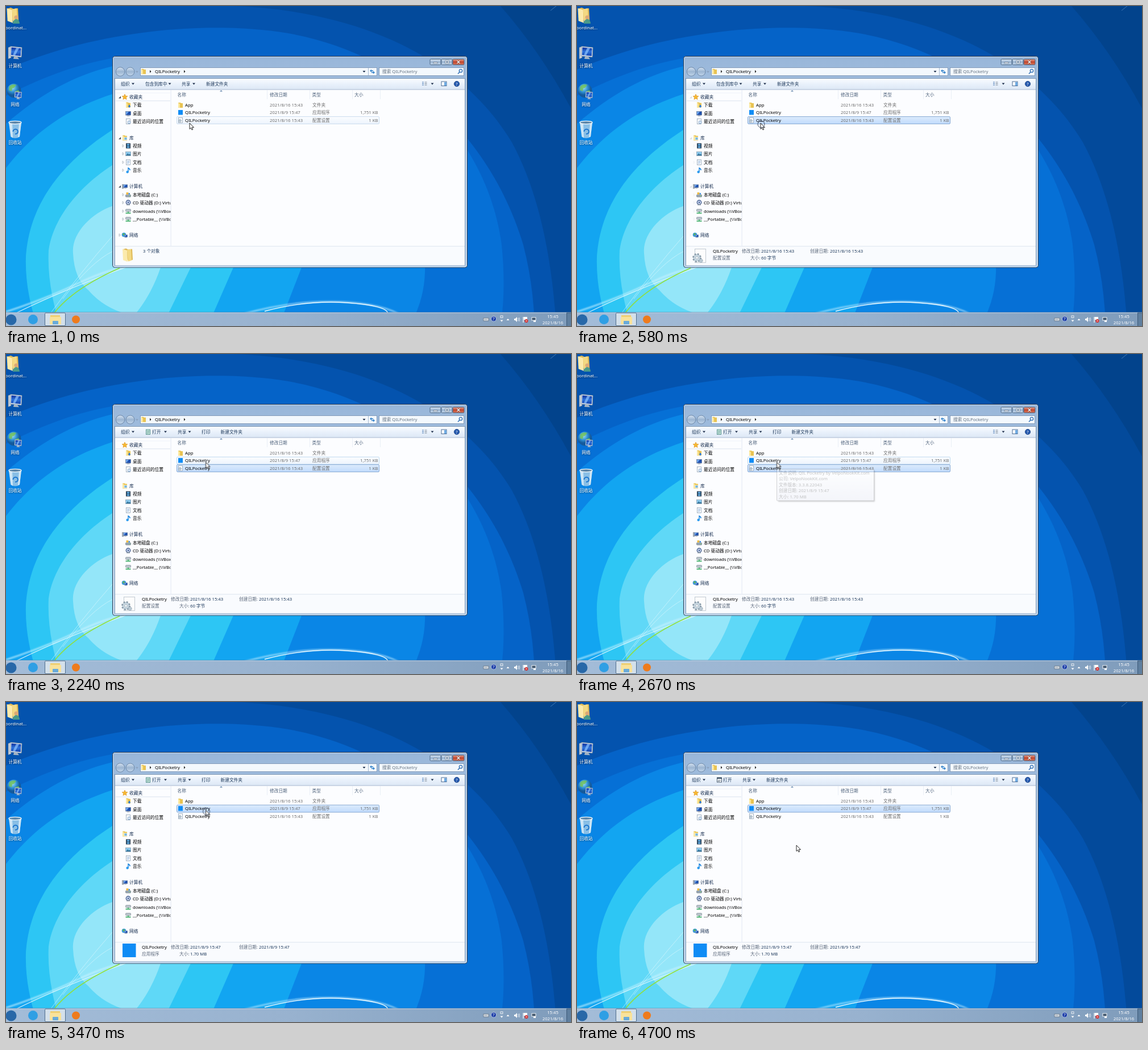
Write an HTML page that moves like this. It is 994 by 563 pixels and loops after 8 s.

```html
<!DOCTYPE html>
<html lang="zh-CN">
<head>
<meta charset="utf-8">
<title>文件夹窗口</title>
<style>
html, body { margin: 0; width: 100%; height: 100%; overflow: hidden; background: #034a9b; }
svg { display: block; width: 994px; height: 563px; }
text { font: 7.7px "Noto Sans", "Noto Sans CJK SC", "Open Sans", sans-serif; white-space: pre; }
.desk { filter: drop-shadow(0 1px 1px #0008); }
</style>
</head>
<body>
<svg id="stage" viewBox="0 0 994 563" xmlns="http://www.w3.org/2000/svg"></svg>
<script>
const LOOP = 8000;
const APP = 'QILPocketry';
const SITE = 'VelpoNookKit.com';

const rect = (x, y, w, h, fill, more = '') =>
  `<rect x="${x}" y="${y}" width="${w}" height="${h}" fill="${fill}" ${more}/>`;
const circle = (x, y, r, fill, more = '') =>
  `<circle cx="${x}" cy="${y}" r="${r}" fill="${fill}" ${more}/>`;
const path = (d, fill, more = '') => `<path d="${d}" fill="${fill}" ${more}/>`;
const line = (d, color, w = 1, more = '') =>
  path(d, 'none', `stroke="${color}" stroke-width="${w}" ${more}`);
// y is the middle of the line of text
const text = (x, y, s, fill = '#000', more = '') =>
  `<text x="${x}" y="${y + 2.8}" fill="${fill}" ${more}>${s}</text>`;
const group = (id, body, more = '') => `<g id="${id}" ${more}>${body}</g>`;
const at = (x, y, body, k = 1) => `<g transform="translate(${x} ${y}) scale(${k})">${body}</g>`;
const ramp = (id, ...colors) =>
  `<linearGradient id="${id}" x2="0" y2="1">${colors.map((c, i) =>
    `<stop offset="${i / (colors.length - 1)}" stop-color="${c}"/>`).join('')}</linearGradient>`;
const down = (x, y, fill = '#1e2f4c') => path(`M${x - 2.5} ${y - 1.5}h5l-2.5 3z`, fill);
const right = (x, y) => path(`M${x - 1} ${y - 2.5}v5l2.5 -2.5z`, '#222');

// icons, drawn around their own middle
const folder = path('M-4-4.5h4l1 1h3v8h-8z', '#e9c352') + path('M-4-4l3 1.5V5l-3-1z', '#fbe79b');
const bigFolder = path('M-9-10l5-1.5 4 2 7-1 1 19-8 2z', '#dfb957') +
  path('M-2-9l7-1.5 1 20-6 2z', '#f3d983') + path('M-10-10.5l8 2.5 1 20-8-3z', '#fbeaac');
const page = rect(-3.5, -4.5, 7, 9, '#fff', 'stroke="#8da0b4" stroke-width=".8"');
const gear = r => circle(0, 0, r, '#b9cbd8', `stroke="#8a9caa" stroke-width="${r * .45}" stroke-dasharray="${r * .42} ${r * .365}"`) +
  circle(0, 0, r * .8, '#c9d8e2') + circle(0, 0, r * .35, '#f5f8fa', 'stroke="#8798a5" stroke-width=".6"');
const config = page + at(-1, .8, gear(2.4));
const screen = rect(-4.5, -3.5, 9, 6.5, '#1d4fae', 'stroke="#7888a0" stroke-width=".8"') +
  path('M-4-3h5l-4 5h-1z', '#6ea6ee') + rect(-2.5, 3.5, 5, 1.2, '#8794a5');
const pc = rect(-4.5, -3, 2.5, 7, '#aeb9c6', 'stroke="#66778b" stroke-width=".6"') + at(1.2, 0, screen, .8);
const globe = circle(-1.5, -.5, 3.8, '#3c9bd8') + path('M-4-2q2-2 4 0l-2 3z', '#62b553') + at(2, 1.8, screen, .6);
const drive = rect(-4.5, 0, 9, 4, '#9aa8b5', 'rx="1" stroke="#64717e" stroke-width=".6"') + rect(1.5, 1.6, 2, 1, '#6de06b');
const share = rect(-4.5, -3.5, 9, 4, '#bcc6cf', 'rx="1" stroke="#6d7983" stroke-width=".6"') +
  path('M-.7.5h1.4v2h3.8v1.7h-9v-1.7h3.8z', '#37aa62');
const icons = {
  star: path('M0-5l1.4 3.3 3.6.3-2.7 2.4.8 3.5L0 2.7l-3.1 1.8.8-3.5L-5-1.4l3.6-.3z', '#f8b92f', 'stroke="#d68a1d" stroke-width=".6"'),
  down: folder + path('M1 0h2v2h1.5L2 5-.5 2H1z', '#2b7de0'),
  desk: screen,
  recent: page + circle(1.5, 1.5, 2.5, '#dceaf8', 'stroke="#5c86b4" stroke-width=".7"'),
  lib: folder + rect(-1, -1, 5, 4.5, '#76b7dd', 'stroke="#fff" stroke-width=".6"'),
  video: rect(-4, -4.5, 8, 9, '#26394d') + rect(-2.4, -3.4, 4.8, 3, '#5ca7dc') + rect(-2.4, .6, 4.8, 3, '#5ca7dc'),
  photo: rect(-4.5, -3.5, 9, 7, '#8fcdf1', 'stroke="#8594a4" stroke-width=".7"') + path('M-4 3l3-4 2 2 2-1 1.5 3z', '#39799f'),
  doc: page + line('M-2-2h4M-2 0h4M-2 2h3', '#5b8fc6', .7),
  music: line('M0 3.5V-4q3 1 3 4', '#1b83dc', 1.5) + circle(-1.4, 3, 2.2, '#2d9cf0'),
  pc, net: globe,
  disk: drive + rect(-3.5, -4, 4, 3.5, '#efb93e') + rect(.5, -3, 2.5, 2.5, '#3f8ee0'),
  cd: circle(0, -.5, 3.8, '#c9d4ec', 'stroke="#3d5789" stroke-width="1.2"') + circle(0, -.5, 1.2, '#32528f') + rect(-3, 2.5, 6, 2, '#8795a5'),
  share
};

const defs = `<defs>
<linearGradient id="bar"><stop stop-color="#a3bcd8"/><stop offset=".5" stop-color="#98b2cf"/><stop offset="1" stop-color="#7f9cbb"/></linearGradient>
${ramp('frame', '#98b6d9', '#b5cee9', '#b9d1ea')}
${ramp('tools', '#fafcff', '#e9f1fb', '#dce7f5')}
${ramp('picked', '#dcebfc', '#c1dbfc')}
${ramp('hover', '#fbfdff', '#edf4fd')}
${ramp('tip', '#ffffff', '#e4e5f0')}
${ramp('knob', '#d6e3f2', '#9db6d2', '#c3d7ec')}
${ramp('red', '#e2a08f', '#c4472e', '#d2755a')}
${ramp('glass', '#0d2f9c', '#2f74dc', '#0f3fae')}
<radialGradient id="earth" cx=".4" cy=".3"><stop stop-color="#9fdcf8"/><stop offset=".6" stop-color="#2d8fd2"/><stop offset="1" stop-color="#145a9c"/></radialGradient>
<clipPath id="side"><rect x="192" y="148" width="97.5" height="274"/></clipPath>
<filter id="soft"><feGaussianBlur stdDeviation="1.2"/></filter></defs>`;

function wallpaper() {
  const bands = [
    ['M0 0H400C620 8 800 90 890 240Q955 360 968 563H0z', '#0453ae'],
    ['M0 112C150 45 330 30 450 42C680 62 850 220 910 420Q928 490 930 563H0z', '#0563c8'],
    ['M0 158C70 122 130 102 187 92H600C740 130 850 260 872 420Q880 500 870 563H0z', '#0670d6'],
    ['M0 207C60 155 120 122 187 106H600C700 260 740 400 737 470Q735 520 710 563H0z', '#0a86e6'],
    ['M0 285C50 220 110 180 187 155H450Q540 330 520 460L480 563H0z', '#12a5f1'],
    ['M35 440C40 370 75 290 187 218H350Q420 360 400 460L355 563H55Q33 500 35 440z', '#2dc6f4'],
    ['M75 430C80 390 110 330 187 280H270Q345 380 325 460L275 563H95Q72 490 75 430z', '#5fd8f7'],
    ['M118 435C115 400 150 365 187 352H250Q290 410 272 460Q255 510 225 545Q175 535 145 500Q120 480 118 435z', '#94e6f9']
  ];
  return rect(0, 0, 994, 563, '#034a9b') + path('M870 0H994V180Q940 80 870 0z', '#02438c') +
    bands.map(([d, c]) => path(d, c)).join('') +
    line('M0 538Q70 515 120 491T205 460', '#c9f3ff', 3, 'opacity=".65" filter="url(#soft)"') +
    line('M18 540Q100 500 210 460', '#effcff', 1.2, 'opacity=".85"') +
    line('M84 541Q118 497 200 461', '#8fe03c', 1.6) +
    line('M78 541Q130 470 187 405M100 515Q150 450 187 432', '#e4faff', .8, 'opacity=".7"') +
    line('M420 541Q500 519 575 520T690 541', '#bdeaff', 3, 'opacity=".6" filter="url(#soft)"') +
    line('M455 537Q530 517 600 522T672 541', '#f1fcff', 1.3) +
    line('M958 8L968 0', '#4c86bd', .8);
}

function desktop() {
  const monitor = path('M-9-11L11-9 10 8-10 6z', '#dce5ee', 'stroke="#7d8b9b" stroke-width=".7"') +
    path('M-7.5-9.2L9.5-7.5 8.7 6-8.3 4.3z', 'url(#glass)') + path('M1-8.3l5 .5L-1 5l-4-.4z', '#8ec5ff', 'opacity=".7"') +
    path('M-3 7l6 .6 3 4-10-.5z', '#aab7c5');
  const tower = path('M-13-9l5-2v20l-5 2z', '#c7d1dc', 'stroke="#6c7b8c" stroke-width=".6"');
  const earth = circle(0, 0, 12.5, 'url(#earth)') +
    path('M-8-8q6-5 12-2l-4 5-3 1-1 5-5-2zM2 1l6-2 2 4-5 6z', '#74c25a', 'opacity=".85"');
  const bin = path('M-11-13H11L8 12Q0 17-8 12z', '#a9cde6', 'opacity=".8"') +
    path('M-11-13l4 25 3 2-1-27zM7-13h4L8 12l-3 1z', '#e6f3fb', 'opacity=".75"') +
    '<ellipse cy="-13" rx="11" ry="2.6" fill="#5d86a8" stroke="#eef7fc" stroke-width="1.4"/>' +
    line('M-3.5 3a4.2 4.2 0 1 1 3.5 4', '#1f78cf', 2);
  return at(13, 16, bigFolder, 1.15) + circle(18, 20, 3.6, '#dba877') + path('M12 31q1-8 6-8t6 8z', '#4a9a8a') +
    at(17, 82, tower + monitor) + at(14, 149, earth) + at(21, 157, monitor, .6) + at(16, 218, bin) +
    text(36, 38, 'Coordinat...', '#fff', 'class="desk" text-anchor="end"') +
    [['计算机', 105], ['网络', 173], ['回收站', 240]].map(([s, y]) => text(16, y, s, '#fff', 'class="desk" text-anchor="middle"')).join('');
}

function taskbar() {
  return rect(0, 539, 994, 24, 'url(#bar)') + rect(0, 538.6, 994, .8, '#5c7c9f') + rect(0, 539.4, 994, .9, '#c3d5e6') +
    circle(9, 552, 9.5, '#2868a8') + circle(47.5, 551.5, 8.5, '#2f9fe4') +
    rect(68.5, 540, 36, 22.5, '#d3e0eb', 'rx="1.5" stroke="#506d8c"') +
    rect(78, 544, 17, 14, '#efcf72') + rect(77, 547, 20, 13, '#f8e29b', 'rx="1"') + rect(82, 554, 10, 6, '#69abda', 'rx="1"') +
    circle(123, 551.5, 7, '#ee7b1d') +
    rect(840, 549, 9, 5, '#d4dbe2', 'stroke="#5e6c7a" stroke-width=".7"') + line('M842 551.5h5', '#5e6c7a', .8, 'stroke-dasharray="1 .7"') +
    circle(858, 550.5, 4.5, '#1d3fa8', 'stroke="#dce6f4" stroke-width=".7"') + text(858, 550.3, '?', '#fff', 'text-anchor="middle" font-weight="700"') +
    rect(870, 545, 4, 3.5, 'none', 'stroke="#fff" stroke-width=".8"') + down(872, 554, '#fff') +
    path('M880.5 553h5l-2.5-3z', '#fff') +
    path('M894 550h2l3-3v9l-3-3h-2z', '#fff') + line('M900.5 549q2 2.5 0 5M902.5 548q2.5 3.5 0 7', '#fff', .8) +
    line('M910 547v10', '#fff', 1.2) + path('M911 547h6v5h-6z', '#fff') +
    circle(915.5, 554, 3, '#d12b2b') + line('M914.3 552.8l2.4 2.4m0-2.4l-2.4 2.4', '#fff', .8) +
    rect(925, 548, 7, 5, '#40566d', 'stroke="#fff" stroke-width=".9"') + rect(928, 553, 4, 3, '#fff') +
    text(962, 546, '15:45', '#fff', 'text-anchor="middle"') + text(962, 557, '2021/8/16', '#fff', 'text-anchor="middle"') +
    rect(986.5, 540, 8, 23.5, '#5f7f9f', 'stroke="#3d5a79"');
}

function chrome() {
  const button = (x, w, fill) => rect(x, 93.5, w, 10, fill, 'rx="1.5" stroke="#46617f" stroke-width=".9"');
  return rect(187.5, 88.5, 624, 371.5, 'url(#frame)', 'rx="4" stroke="#20344d"') +
    rect(188.5, 89.5, 622, 369.5, 'none', 'rx="3" stroke="#dbe9f7" stroke-width=".8"') +
    button(746, 19, 'url(#knob)') + button(766, 19, 'url(#knob)') + button(786, 20, 'url(#red)') +
    rect(752, 99, 7, 2, '#fff', 'stroke="#465b74" stroke-width=".6"') +
    rect(773.5, 96.5, 5, 4, 'none', 'stroke="#465b74" stroke-width="2"') + rect(773.5, 96.5, 5, 4, 'none', 'stroke="#fff"') +
    line('M793.5 96l5 5m0-5l-5 5', '#5b2a25', 2.4) + line('M793.5 96l5 5m0-5l-5 5', '#fff', 1.3) +
    circle(201, 115.5, 7.8, 'url(#knob)', 'stroke="#6d88a8"') + circle(218.5, 115.5, 7.5, 'url(#knob)', 'stroke="#6d88a8"') +
    down(230.5, 116, '#8aa1bd') +
    rect(236.5, 108.5, 416, 14, '#f3f8fd', 'stroke="#7d97b5" stroke-width=".9"') + line('M637.5 109v13', '#a6bbd2') +
    at(242, 115.3, folder) + right(254, 115.3) + text(262, 115, APP) + right(314, 115.3) + down(630, 115.5) +
    path('M640 114l3-2.5v1.7h3v1.6h-3v1.7zM649 117l-3-2.5v1.7h-3v1.6h3v1.7z', '#2f7fc9') +
    rect(656.5, 108.5, 149, 14, '#f3f8fd', 'stroke="#7d97b5" stroke-width=".9"') +
    text(662, 115, '搜索 ' + APP, '#62707f', 'font-style="italic"') +
    circle(800, 114, 2.7, 'none', 'stroke="#2f6fb5" stroke-width="1.3"') + line('M798 116.2l-3 3', '#2f6fb5', 1.6) +
    rect(191.5, 127.5, 616, 329, '#fcfdff', 'stroke="#6f8aa9" stroke-width=".8"') +
    rect(192, 128, 615, 19, 'url(#tools)') + rect(192, 146.5, 615, 1, '#a9b9cf') +
    line('M732 134h3m-3 2.5h3m-3 2.5h3', '#4f7db4', 1.2) + line('M736.5 134h4m-4 2.5h4m-4 2.5h4', '#7d8896', 1) + down(750, 137) +
    rect(766, 133, 9, 7.5, '#fff', 'stroke="#4d6d94"') + rect(771, 134, 4, 6, '#6eaae2') +
    circle(793, 137, 4.7, '#2458ad', 'stroke="#163d7c" stroke-width=".7"') + text(793, 136.8, '?', '#fff', 'text-anchor="middle"');
}

function tools() {
  const ink = '#1e395b';
  const item = (x, s, arrow) => text(x, 137, s, ink) + (arrow ? down(arrow, 137) : '');
  const notepad = rect(246.5, 133, 7, 8.5, '#c4e4da', 'stroke="#518c89" stroke-width=".9"') + line('M248 135.5h4m-4 2h4m-4 2h3', '#518c89', .7);
  const program = rect(246.5, 133, 8, 8, '#fff', 'stroke="#34495f" stroke-width=".9"') + rect(246.5, 133, 8, 2, '#34495f') + line('M248 137.5h5m-5 2h3', '#34495f', .7);
  return item(202, '组织', 223.5) +
    group('barNone', item(245, '包含到库中', 288) + item(309, '共享', 330.5) + item(352, '新建文件夹')) +
    group('barConfig', notepad + item(257, '打开', 280.5) + item(302, '共享', 323) + item(344, '打印') + item(377.5, '新建文件夹')) +
    group('barApp', program + item(257, '打开') + item(291, '共享', 311.5) + item(333, '新建文件夹'));
}

function sidebar() {
  const open = [160, 232, 317], shut = [246, 260, 275, 289, 332, 346, 361, 375];
  const heads = [['star', '收藏夹', 160], ['lib', '库', 232], ['pc', '计算机', 317], ['net', '网络', 403]];
  const items = [['down', '下载', 174], ['desk', '桌面', 189], ['recent', '最近访问的位置', 203],
    ['video', '视频', 246], ['photo', '图片', 260], ['doc', '文档', 275], ['music', '音乐', 289],
    ['disk', '本地磁盘 (C:)', 332], ['cd', 'CD 驱动器 (D:) VirtualBox', 346],
    ['share', 'downloads (\\\\VBoxSvr)', 361], ['share', '__Portable__ (\\\\VBoxSvr)', 375]];
  const row = x => ([icon, s, y]) => at(x, y, icons[icon]) + text(x + 8, y, s, x < 212 ? '#152c4e' : '#000');
  const hollow = (x, y) => path(`M${x} ${y - 2.3}v4.6l2.5-2.3z`, '#fff', 'stroke="#9aa5b1" stroke-width=".7"');
  return rect(289.7, 148, .8, 274, '#dbe4f0') + rect(193, 152.7, 96, .6, '#e3eaf3') + rect(193, 166.5, 96, .8, '#d4deea') +
    `<g clip-path="url(#side)">` + heads.map(row(209)).join('') + items.map(row(215)).join('') + '</g>' +
    group('arrows', open.map(y => path(`M202 ${y - 1.5}v4h-4z`, '#404b57')).join('') +
      shut.map(y => hollow(205, y)).join('') + hollow(199, 403));
}

function files() {
  const bar = (id, y, fill, edge) => group(id, rect(300.5, y, 356, 12.8, fill, `rx="1.5" stroke="${edge}" stroke-width=".9"`));
  const gray = '#6d6d6d', head = '#4c607a';
  const row = (y, icon, name, date, kind, size) => at(307, y, icon) + text(315, y, name) +
    text(464, y, date, gray) + text(539, y, kind, gray) + text(654.5, y, size, gray, 'text-anchor="end"');
  return [[301.5, '名称'], [464, '修改日期'], [538.5, '类型'], [613, '大小']].map(([x, s]) => text(x, 156, s, head)).join('') +
    [459, 534, 609, 658].map(x => rect(x, 148, .7, 16, '#e2e9f2')).join('') +
    path('M376 150.5h5l-2.5-2.5z', '#6c8db0') +
    bar('hoverApp', 181.2, 'url(#hover)', '#b8d6ee') + bar('hoverConfig', 194.6, 'url(#hover)', '#c5d9ec') +
    bar('pickApp', 181.2, 'url(#picked)', '#7da2ce') + bar('pickConfig', 194.6, 'url(#picked)', '#7da2ce') +
    row(174.5, folder, 'App', '2021/8/16 15:43', '文件夹', '') +
    row(187.5, rect(-4, -4.5, 8, 8.5, '#0f8cf5'), APP, '2021/8/9 15:47', '应用程序', '1,751 KB') +
    row(201, config, APP, '2021/8/16 15:43', '配置设置', '1 KB');
}

function details() {
  const soft = '#5a6779', ink = '#1e395b';
  const info = (kind, date, size) => text(239, 431.5, APP) + text(239, 442.8, kind, soft) +
    text(290, 431.5, '修改日期:', soft) + text(324, 431.5, date, ink) +
    text(410, 431.5, '创建日期:', soft) + text(445, 431.5, date, ink) +
    text(305, 442.8, '大小:', soft) + text(324, 442.8, size, ink);
  return rect(192, 422.5, 615, .9, '#ccd8e6') + rect(192, 423.4, 615, 33, '#f9fbfe') +
    group('infoNone', at(215, 438, bigFolder) + text(241, 431.5, '3 个对象', ink)) +
    group('infoConfig', rect(207.5, 427.5, 19, 24, '#fdfdfd', 'stroke="#b4bdc6" stroke-width=".8"') +
      at(211, 443, gear(6.5)) + at(218, 448, gear(3)) + info('配置设置', '2021/8/16 15:43', '60 字节')) +
    group('infoApp', rect(205, 425, 23.5, 24, '#0f8cf5') + info('应用程序', '2021/8/9 15:47', '1.70 MB'));
}

function tooltip() {
  const lines = [`文件说明: QIL Pocketry by ${SITE}`, `公司: ${SITE}`, '文件版本: 3.3.8.22043', '创建日期: 2021/8/9 15:47', '大小: 1.70 MB'];
  return group('tooltip', rect(354, 205, 170, 55, '#000', 'opacity=".5" filter="url(#soft)"') +
    rect(351.5, 202.5, 171, 55.5, 'url(#tip)', 'rx="1" stroke="#767676" stroke-width=".9"') +
    lines.map((s, i) => text(355, 209 + i * 10.5, s, '#575757')).join(''));
}

const pointer = group('pointer',
  path('M0 0V10.5L2.4 8.3 4 12 5.7 11.2 4.2 7.7H7.5z', '#fff', 'stroke="#111" stroke-width=".9"') +
  group('ring', circle(1, 2, 6, 'none', 'stroke="#33415a" stroke-width=".9"')));

document.getElementById('stage').innerHTML = defs + wallpaper() + desktop() + taskbar() + chrome() +
  tools() + sidebar() + files() + details() + tooltip() + pointer;

// steps: [time, value], each held until the next
function hold(id, prop, steps) {
  const frames = steps.map(([t, v]) => ({ offset: t / LOOP, [prop]: v, easing: 'steps(1, end)' }));
  frames.push({ offset: 1, [prop]: steps[steps.length - 1][1] });
  document.getElementById(id).animate(frames, { duration: LOOP, iterations: Infinity });
}

const fades = {
  arrows: [[0, 1], [120, .9], [280, .65], [430, .4], [580, .18], [730, 0]],
  barNone: [[0, 1], [730, 0]],
  barConfig: [[0, 0], [730, 1], [3620, .4], [3740, 0]],
  barApp: [[0, 0], [3620, .6], [3740, 1]],
  hoverConfig: [[0, 1], [580, 0]],
  pickConfig: [[0, 0], [580, 1], [3470, 0]],
  hoverApp: [[0, 0], [1560, .5], [1680, 1], [3470, 0]],
  pickApp: [[0, 0], [3470, 1]],
  infoNone: [[0, 1], [580, 0]],
  infoConfig: [[0, 0], [580, 1], [3470, 0]],
  infoApp: [[0, 0], [3470, 1]],
  tooltip: [[0, 0], [2670, .35], [2790, .75], [2940, 1], [3470, 0]],
  ring: [[0, 0], [580, 1], [730, 0], [3470, 1], [3620, 0]]
};
for (const id in fades) hold(id, 'opacity', fades[id]);

const moves = [[0, 323, 206], [1410, 339.5, 200], [1560, 347, 195], [1680, 353, 191.5], [2240, 351.5, 190.5],
  [3890, 364, 213], [4010, 391, 247], [4130, 386, 252]];
hold('pointer', 'transform', moves.map(([t, x, y]) => [t, `translate(${x}px, ${y}px)`]));
</script>
</body>
</html>
```
